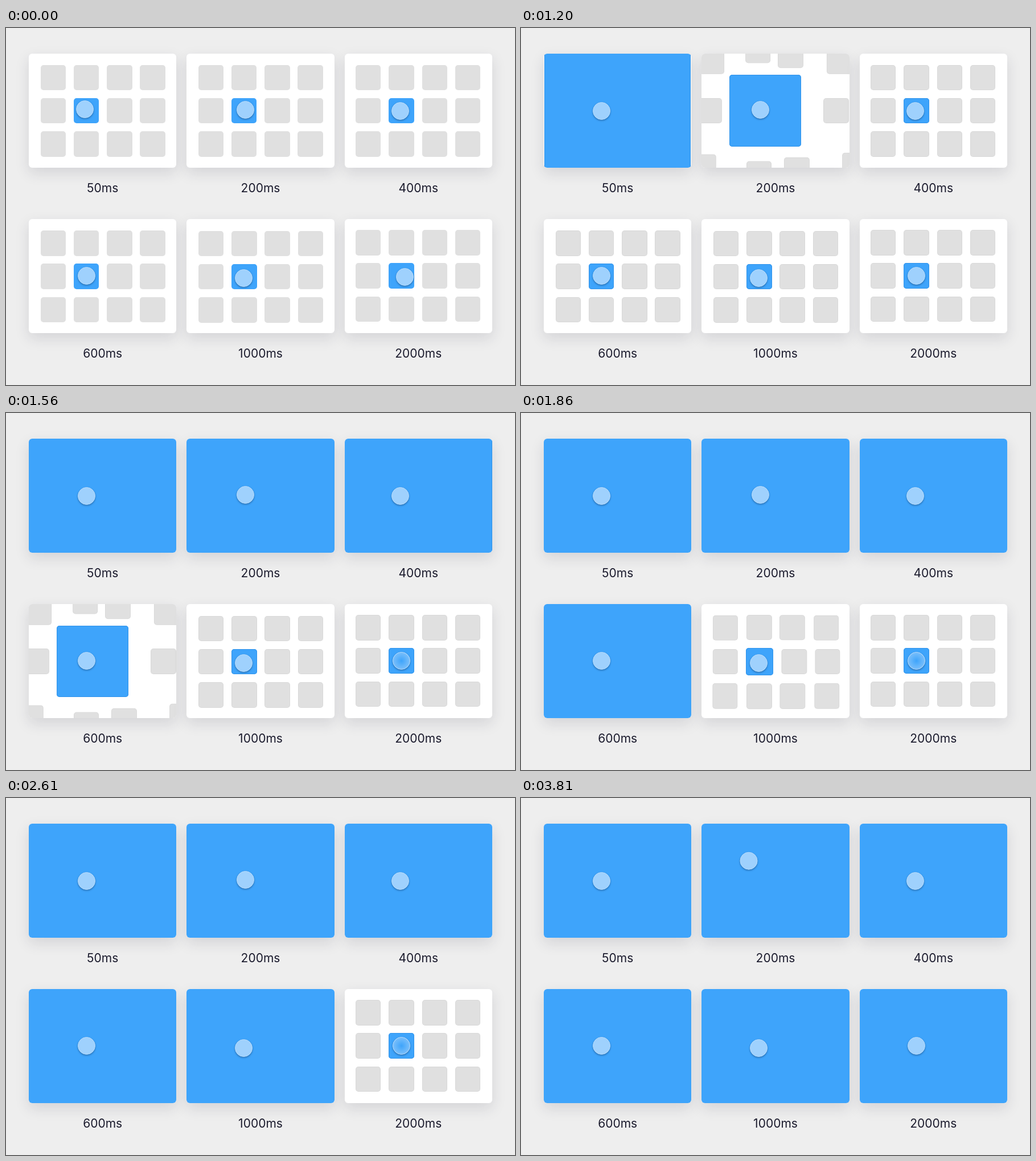
An HTML page for the animation above (3840 ms loop, 894x626 px).

```html
<!DOCTYPE html>
<html lang="en">
<head>
<meta charset="utf-8">
<title>Hover delays</title>
<style>
  html, body { margin: 0; width: 100%; height: 100%; overflow: hidden; background: #eee; }
  body > *, .card > * { position: absolute; box-sizing: border-box; }
  .card {
    width: 259.4px; height: 200.4px; border-radius: 6px; overflow: hidden; background: #fff;
    box-shadow: 0 9px 25px rgba(35, 40, 65, .13);
  }
  .tile { width: 44.5px; height: 44.5px; border-radius: 5px; background: #e0e0e0; }
  .tile.outlined { box-shadow: inset 0 0 0 1px rgba(0, 0, 0, .035); }
  .blue { background: #3ea4fb; }
  .blue.outlined { box-shadow: inset 0 0 0 1px #3093ea; }
  .cursor {
    width: 31px; height: 31px; margin: -15.5px; border-radius: 50%; overflow: hidden;
    background: #9fd1fd; border: 1px solid #b7dcfc;
    box-shadow: 0 1.5px 3px rgba(0, 25, 60, .35);
  }
  .glow {
    width: 100%; height: 100%; border-radius: 50%;
    background: radial-gradient(circle, #3ea4fb 0%, #5fb3fb 40%, #90c8fa 100%);
  }
  .label {
    width: 259.4px; text-align: center; color: #1b1b2d;
    font: 21px/26px Inter, "Liberation Sans", sans-serif;
  }
</style>
</head>
<body>
<script>
const LOOP = 3840;
const HOVER_START = 939;   // moment every delay starts counting
const RATE = 0.9;          // playback time per labelled millisecond
const GROW = 270;
const PITCH = 58.3;
const TILE = 44.5;

// Where each tile has travelled once the blue one fills the card; null is the blue one.
const DRIFT = [
  [-66, -75], [-5, -126], [-8, -103], [66, -75],
  [-77, 0], null, [204, 0], [204, 0],
  [-104, 107], [0, 139], [21, 121], [138, 100]
];
const SPREAD = { left: 79.5, right: 137.5, top: 108, bottom: 107 };

const CARDS = [
  { delay: 50, x: 40, y: 44.5, inset: [20.5, 20], cursor: [141, 145], from: [-3, -3] },
  { delay: 200, x: 317.3, y: 44.5, inset: [20.3, 20], cursor: [420, 143], leave: [-20, -32.5] },
  { delay: 400, x: 594.6, y: 44.5, inset: [19.4, 20], cursor: [692.7, 145] },
  { delay: 600, x: 40, y: 334.5, inset: [20.5, 20.6], cursor: [141, 434] },
  { delay: 1000, x: 317.3, y: 334.5, inset: [20.5, 21], cursor: [417.8, 438.3] },
  { delay: 2000, x: 594.6, y: 334.5, inset: [19.4, 19.6], cursor: [694.3, 434], from: [6, 2], glows: true }
];

const clamp = v => Math.min(1, Math.max(0, v));
const ramp = (t, start, length) => clamp((t - start) / length);

// cubic-bezier(.4, 0, .2, 1)
function standardEase(x) {
  if (x <= 0 || x >= 1) return clamp(x);
  let lo = 0, hi = 1;
  for (let i = 0; i < 24; i++) {
    const s = (lo + hi) / 2, r = 1 - s;
    if (1.2 * r * r * s + 0.6 * r * s * s + s ** 3 < x) lo = s; else hi = s;
  }
  return 3 * (1 - lo) * lo * lo + lo ** 3;
}

function add(parent, className, x, y) {
  const el = parent.appendChild(document.createElement('div'));
  el.className = className;
  el.style.left = x + 'px';
  el.style.top = y + 'px';
  return el;
}

for (const c of CARDS) {
  const card = add(document.body, 'card', c.x, c.y);
  const place = i => [c.inset[0] + PITCH * (i % 4), c.inset[1] + PITCH * Math.floor(i / 4)];
  c.tiles = DRIFT.map((drift, i) => drift && { drift, el: add(card, 'tile', ...place(i)) }).filter(Boolean);
  c.home = place(5);
  c.blue = add(card, 'tile blue', ...c.home);
  c.pointer = add(document.body, 'cursor', ...c.cursor);
  if (c.glows) c.glow = add(c.pointer, 'glow', 0, 0);
  add(document.body, 'label', c.x, c.y + 223).textContent = c.delay + 'ms';
}

function draw(t) {
  const approach = (1 - ramp(t, 0, 300)) ** 2;
  const exit = ((t - 3726) / 84) ** 2 * (t > 3726);

  for (const c of CARDS) {
    const start = HOVER_START + RATE * c.delay;
    const p = standardEase(ramp(t, start, GROW));

    for (const { el, drift } of c.tiles) {
      el.style.transform = `translate(${drift[0] * p}px, ${drift[1] * p}px)`;
      el.classList.toggle('outlined', t >= 720);
    }

    const s = c.blue.style;
    s.left = c.home[0] - SPREAD.left * p + 'px';
    s.top = c.home[1] - SPREAD.top * p + 'px';
    s.width = TILE + (SPREAD.left + SPREAD.right) * p + 'px';
    s.height = TILE + (SPREAD.top + SPREAD.bottom) * p + 'px';
    c.blue.classList.toggle('outlined', t >= 300 && p < 1);

    const [fx, fy] = c.from || [0, 0];
    const [lx, ly] = c.leave || [0, 0];
    c.pointer.style.transform =
      `translate(${fx * approach + lx * exit}px, ${fy * approach + ly * exit}px)`;
    if (c.glow) c.glow.style.opacity = ramp(t, 1320, 120) * (1 - ramp(t, start - 60, 60));
  }
}

const began = performance.now();
function tick() {
  draw((performance.now() - began) % LOOP);
  requestAnimationFrame(tick);
}
tick();
</script>
</body>
</html>
```
